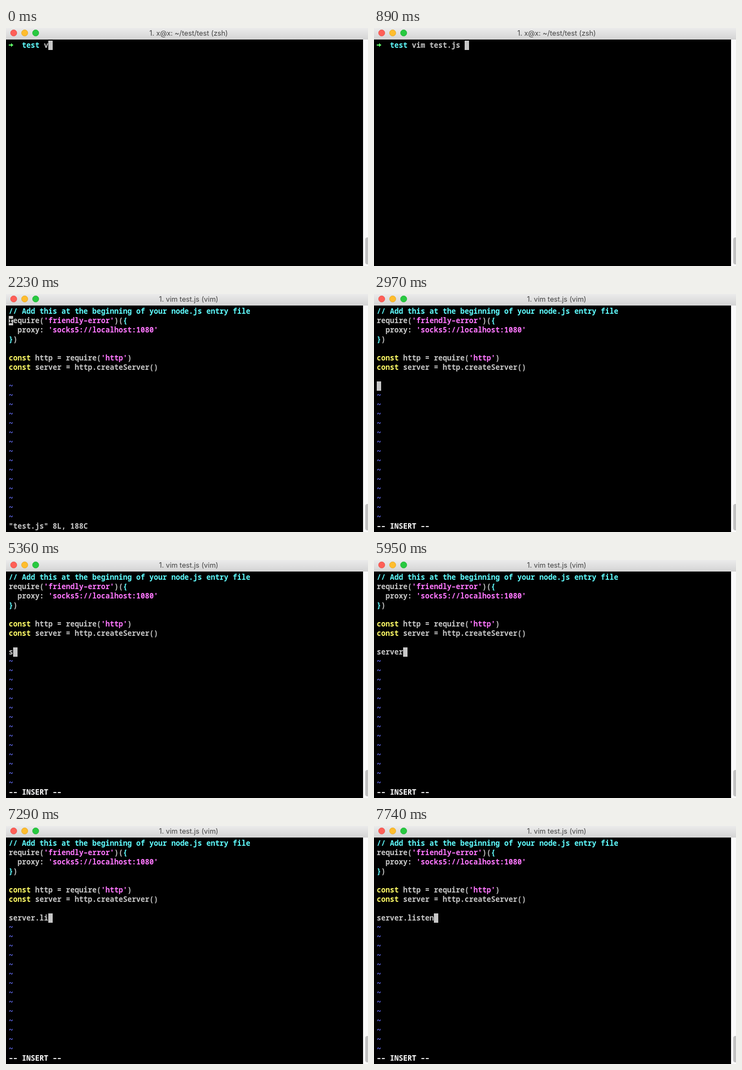
Write an HTML page with a canvas that moves like this. It is 659 px wide and 433 px high and loops after 8 s.

```html
<!DOCTYPE html>
<html lang="en">
<head>
<meta charset="utf-8">
<title>Terminal</title>
<style>
html, body { margin: 0; width: 100%; height: 100%; overflow: hidden; background: #000; }
canvas { display: block; }
</style>
</head>
<body>
<canvas id="stage" width="659" height="433"></canvas>
<script>
const ctx = document.getElementById('stage').getContext('2d');
const LOOP = 8000, LEFT = 5, TOP = 23, CELL = 8, LINE = 17;
const GREY = '#c7c7c7', CYAN = '#60fdff', YELLOW = '#fffc67',
      PINK = '#ff77ff', BLUE = '#6871ff', GREEN = '#60fa68';

// Each timeline lists [start in ms, value]; the latest started value holds.
const command = [[0, 'v'], [300, 'vi'], [450, 'vim'], [600, 'vim '], [740, 'vim t'], [890, 'vim test.js ']];
const titles = [[0, '1. x@x: ~/test/test (zsh)'], [1640, '1. vim test.js (zsh)'], [2090, '1. vim test.js (vim)']];
const cursorRow = [[0, 0], [2090, 1], [2240, 2], [2380, 4], [2520, 7]];
const typed = [
  [0, ''], [5360, 's'], [5510, 'se'], [5660, 'ser'], [5800, 'serv'], [5950, 'server'], [6100, 'server.'],
  [6400, 'server.l'], [6550, 'server.ls'], [6700, 'server.lsi'], [7000, 'server.l'],
  [7290, 'server.li'], [7440, 'server.lis'], [7590, 'server.list'], [7740, 'server.listen']
];
const EDITOR_AT = 1490, INSERT_AT = 2970;

const code = [
  [[CYAN, '// Add this at the beginning of your node.js entry file', 550]],
  [[GREY, 'require('], [PINK, "'friendly-error'"], [GREY, ')('], [CYAN, '{', 700]],
  [[GREY, '  proxy: '], [PINK, "'socks5://localhost:1080'"]],
  [[CYAN, '}', 700], [GREY, ')']],
  [],
  [[YELLOW, 'const'], [GREY, ' http = require('], [PINK, "'http'"], [GREY, ')']],
  [[YELLOW, 'const'], [GREY, ' server = http.createServer()']]
];

const at = (timeline, t) => timeline.filter(([start]) => start <= t).pop()[1];

function rect(color, x, y, w, h) {
  ctx.fillStyle = color;
  ctx.fillRect(x, y, w, h);
}

function write(row, col, text, color = GREY, weight = color === GREY ? 550 : 600) {
  ctx.font = `${weight} 13.3333px "Noto Sans Mono", monospace`;
  ctx.textAlign = 'left';
  ctx.fillStyle = color;
  // The terminal face has cell-wide hyphens, so they are drawn as en dashes.
  ctx.fillText(text.replaceAll('-', '–'), LEFT + col * CELL, TOP + row * LINE + 13);
}

function cursor(row, col, color = GREY, char = '') {
  rect(color, LEFT + col * CELL, TOP + row * LINE, CELL, LINE);
  write(row, col, char, '#000');
}

function drawWindow(title, thumbY) {
  rect('#000', 0, 0, 659, 433);
  const bar = ctx.createLinearGradient(0, 0, 0, 21);
  bar.addColorStop(0, '#ebebeb');
  bar.addColorStop(1, '#d4d4d4');
  rect(bar, 0, 0, 659, 21);

  const buttons = [['#ff5f57', '#e2463f'], ['#ffbd2e', '#e1a116'], ['#28c940', '#12ac28']];
  buttons.forEach(([fill, rim], i) => {
    ctx.fillStyle = fill;
    ctx.strokeStyle = rim;
    ctx.lineWidth = 0.7;
    ctx.beginPath();
    ctx.arc(14 + i * 20, 9, 5.7, 0, Math.PI * 2);
    ctx.fill();
    ctx.stroke();
  });

  ctx.font = '12.8px Inter, sans-serif';
  ctx.textAlign = 'center';
  ctx.fillStyle = '#444';
  ctx.fillText(title, 332.5, 14);

  rect('#fafafa', 650, 21, 9, 412);
  ctx.fillStyle = '#c1c1c1';
  ctx.beginPath();
  ctx.roundRect(654, thumbY, 8, 430 - thumbY, 4);
  ctx.fill();
}

function drawShell(t) {
  rect(GREEN, 5, 30, 5, 2);
  ctx.beginPath();
  ctx.moveTo(9, 27.5);
  ctx.lineTo(13.5, 31);
  ctx.lineTo(9, 34.5);
  ctx.fill();
  write(0, 3, 'test', CYAN, 700);
  const text = at(command, t);
  write(0, 8, text);
  cursor(0, 8 + text.length);
}

function drawEditor(t) {
  code.forEach((parts, row) => {
    let col = 0;
    for (const [color, text, weight] of parts) {
      write(row, col, text, color, weight);
      col += text.length;
    }
  });

  const inserting = t >= INSERT_AT;
  for (let row = inserting ? 9 : 8; row < 23; row++) write(row, 0, '~', BLUE, 800);

  if (inserting) {
    const text = at(typed, t);
    write(8, 0, text);
    cursor(8, text.length);
    write(23, 0, '-- INSERT --', '#fff', 700);
  } else {
    const row = at(cursorRow, t);
    const [color, text] = code[row]?.[0] ?? [GREY, ' '];
    cursor(row, 0, color, text[0]);
    write(23, 0, '"test.js" 8L, 188C');
  }
}

function draw(now) {
  const t = now % LOOP;
  const editing = t >= EDITOR_AT;
  drawWindow(at(titles, t), editing ? 382 : 381);
  (editing ? drawEditor : drawShell)(t);
}

const start = performance.now();
function tick() {
  draw(performance.now() - start);
  requestAnimationFrame(tick);
}
tick();
</script>
</body>
</html>
```
